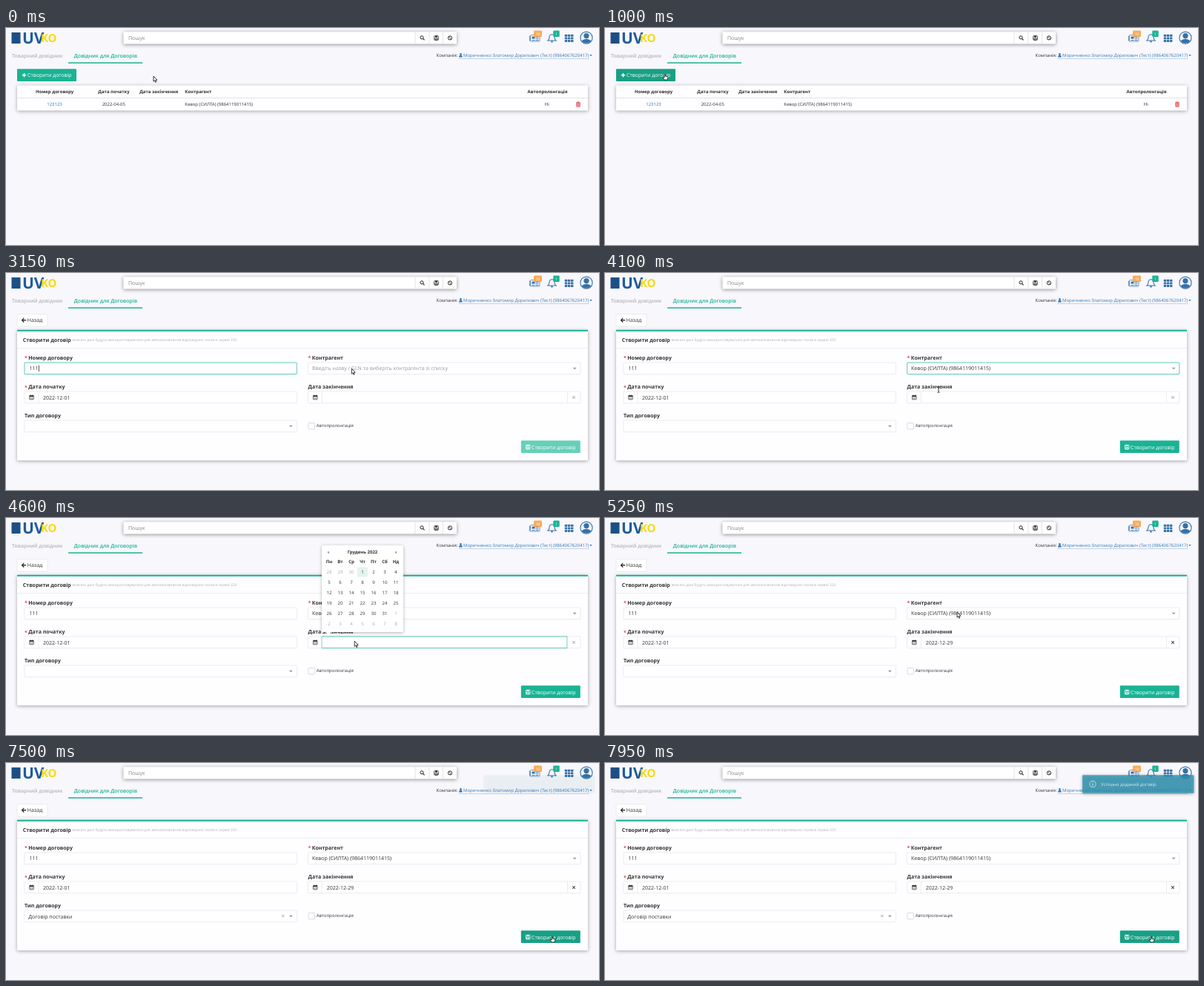
An HTML page with a canvas that plays this animation: 800x293 px, repeating every 8 s.

```html
<!DOCTYPE html>
<html lang="uk">
<head>
<meta charset="utf-8">
<title>Довідник для Договорів</title>
<style>
html, body { margin: 0; width: 100%; height: 100%; overflow: hidden; background: #f8f7fc; }
canvas { display: block; width: 800px; height: 293px; }
</style>
</head>
<body>
<canvas id="stage"></canvas>
<script>
const W = 800, H = 293, LOOP = 8000;
const TEAL = '#1ab394', TEAL_DARK = '#18a085', BLUE = '#337ab7', INK = '#333', LINE = '#e3e4e8';
const PARTNER = 'Кевор (СИЛТА) (9864119011415)';
const canvas = document.getElementById('stage');
const ctx = canvas.getContext('2d');
const dpr = window.devicePixelRatio || 1;
canvas.width = W * dpr;
canvas.height = H * dpr;

// Moments of the story, in ms
const HOVER = 800, OPEN = 1250, FOCUS = 1950, PICK = 3250, PICKED = 3900,
  CALENDAR = 4420, DATED = 5060, TYPES = 5720, TYPED = 6220, AIM = 6970, SAVE = 7350, TOAST = 7480;

// Pointer stops: time, x, y
const PATH = [
  [0, 199, 65], [850, 81, 63], [1350, 81, 63], [1900, 102, 127], [2650, 102, 127],
  [3200, 475, 129], [3680, 475, 129], [3850, 462, 144], [3920, 462, 144], [4100, 450, 157],
  [4350, 470, 168], [4550, 470, 168], [4950, 475, 127], [5280, 475, 127], [5680, 200, 206],
  [5850, 200, 206], [6150, 147, 223], [6380, 147, 223], [7060, 737, 235], [LOOP, 737, 235]
];

const clamp = v => Math.max(0, Math.min(1, v));
const ease = p => p * p * (3 - 2 * p);
const within = (t, a, b) => t >= a && t < b;

function pointerAt(t) {
  const i = PATH.findIndex(k => k[0] > t);
  const [a, b] = [PATH[i - 1], PATH[i]];
  const p = ease((t - a[0]) / (b[0] - a[0]));
  return [a[1] + (b[1] - a[1]) * p, a[2] + (b[2] - a[2]) * p];
}

function text(s, x, y, { size = 7, weight = 400, color = INK, align = 'left' } = {}) {
  ctx.font = `${weight} ${size}px "Open Sans", sans-serif`;
  ctx.fillStyle = color;
  ctx.textAlign = align;
  ctx.textBaseline = 'alphabetic';
  ctx.fillText(s, x, y + size * 0.36);
  return ctx.measureText(s).width;
}

function rect(x, y, w, h, color) {
  ctx.fillStyle = color;
  ctx.fillRect(x, y, w, h);
}

function round(x, y, w, h, r, fill, stroke) {
  ctx.beginPath();
  ctx.roundRect(x, y, w, h, r);
  if (fill) { ctx.fillStyle = fill; ctx.fill(); }
  if (stroke) { ctx.strokeStyle = stroke; ctx.lineWidth = 0.7; ctx.stroke(); }
}

function line(points, color, width = 1, close = false) {
  ctx.beginPath();
  points.forEach(([x, y], i) => i ? ctx.lineTo(x, y) : ctx.moveTo(x, y));
  if (close) ctx.closePath();
  ctx.strokeStyle = color;
  ctx.lineWidth = width;
  ctx.stroke();
}

function poly(points, color) {
  ctx.beginPath();
  points.forEach(([x, y]) => ctx.lineTo(x, y));
  ctx.fillStyle = color;
  ctx.fill();
}

function disc(x, y, r, color) {
  ctx.beginPath();
  ctx.arc(x, y, r, 0, Math.PI * 2);
  ctx.fillStyle = color;
  ctx.fill();
}

function ring(x, y, r, color, width = 1) {
  ctx.beginPath();
  ctx.arc(x, y, r, 0, Math.PI * 2);
  ctx.strokeStyle = color;
  ctx.lineWidth = width;
  ctx.stroke();
}

function card(x, y, w, h, fill = '#fefdff', blur = 5, shade = 'rgba(0,0,0,.34)') {
  ctx.save();
  ctx.shadowColor = shade;
  ctx.shadowBlur = blur * dpr;
  ctx.shadowOffsetY = dpr;
  round(x, y, w, h, 1, fill);
  ctx.restore();
}

// Icons
function floppy(x, y, color, back) {
  round(x - 2.8, y - 2.8, 5.6, 5.6, 0.6, back);
  ctx.strokeStyle = color;
  ctx.lineWidth = 0.8;
  ctx.stroke();
  rect(x - 1.5, y - 2.8, 2.8, 2, color);
  ctx.strokeRect(x - 1.5, y + 0.6, 3, 2.1);
}

function cross(x, y, r, color, width = 0.8) {
  line([[x - r, y - r], [x + r, y + r]], color, width);
  line([[x - r, y + r], [x + r, y - r]], color, width);
}

function caret(x, y, color = '#999', r = 2.5) {
  poly([[x - r, y - r / 2], [x + r, y - r / 2], [x, y + r / 2]], color);
}

function dateIcon(x, y) {
  round(x - 2.8, y - 2.3, 5.6, 5.3, 0.4, null, '#333');
  rect(x - 2.8, y - 2.4, 5.6, 1.6, '#333');
  for (const dx of [-1.4, 1.4]) rect(x + dx - 0.4, y - 3.4, 0.8, 1.6, '#333');
  for (const dx of [-1, 1]) line([[x + dx, y - 1], [x + dx, y + 3]], '#555', 0.4);
  line([[x - 2.8, y + 1], [x + 2.8, y + 1]], '#555', 0.4);
}

function trash(x, y) {
  const red = '#e0494f';
  rect(x - 3, y - 2.6, 6, 0.9, red);
  rect(x - 1.2, y - 3.5, 2.4, 0.9, red);
  round(x - 2.3, y - 1.7, 4.6, 5, 0.5, '#f0a3a6', red);
  for (const dx of [-0.9, 0.9]) line([[x + dx, y - 0.8], [x + dx, y + 2.4]], red, 0.5);
}

function person(x, y, color) {
  disc(x, y - 1.3, 1.4, color);
  round(x - 2.2, y, 4.4, 2.7, [1.6, 1.6, 0.3, 0.3], color);
}

function badge(x, w, label, color) {
  round(x, 3.5, w, 8.5, 1.2, color);
  text(label, x + w / 2, 7.8, { size: 5, color: '#fff', align: 'center' });
}

function header() {
  const blue = '#3571a8';
  rect(7.5, 6, 12, 15, '#1c4f87');
  text('UV', 22, 13.6, { size: 21, weight: 700, color: '#1d5c9c' });
  text('KO', 68.5, 13.6, { size: 15, weight: 700, color: '#fbd90f', align: 'right' });

  card(158.5, 5.2, 449.5, 16.3, '#fff', 5, 'rgba(0,0,0,.42)');
  for (const x of [552, 571, 589.5]) rect(x - 0.4, 5.2, 0.8, 16.3, '#ddd');
  text('Пошук', 165, 13.4, { color: '#858585' });
  ring(561, 12.8, 2.1, '#222', 1);
  line([[562.6, 14.4], [564.5, 16.4]], '#222', 1.2);
  floppy(580.5, 13.4, '#222', '#fff');
  ring(599, 13.4, 2.6, '#222', 1);
  line([[597.2, 11.6], [600.8, 15.2]], '#222', 0.9);

  round(707.5, 9.5, 12.5, 8.5, 1, null, blue);
  line([[707.5, 11], [706.4, 11], [706.4, 17], [707.5, 18]], blue, 0.8);
  rect(709.5, 11.5, 4, 3, blue);
  for (const y of [12, 14, 16]) rect(714.5, y, 4, 0.8, blue);
  rect(709.5, 16, 4, 0.8, blue);
  badge(712, 11, '10', '#f8ac59');

  ctx.beginPath();
  ctx.moveTo(731, 17);
  ctx.quadraticCurveTo(733, 15.5, 733, 12.5);
  ctx.bezierCurveTo(733, 7.5, 740, 7.5, 740, 12.5);
  ctx.quadraticCurveTo(740, 15.5, 742, 17);
  ctx.closePath();
  ctx.strokeStyle = blue;
  ctx.lineWidth = 1.1;
  ctx.stroke();
  disc(736.5, 18.4, 1.2, blue);
  badge(738.3, 8.4, '1', TEAL);

  for (let i = 0; i < 9; i++)
    round(753.8 + i % 3 * 4.1, 8.8 + Math.floor(i / 3) * 3.6, 3.4, 2.9, 0.4, blue);

  ring(783, 13.2, 8.1, blue, 1.1);
  ctx.save();
  ctx.beginPath();
  ctx.arc(783, 13.2, 7.6, 0, Math.PI * 2);
  ctx.clip();
  disc(783, 10.6, 3.6, blue);
  ctx.beginPath();
  ctx.ellipse(783, 20, 7, 5.3, 0, 0, Math.PI * 2);
  ctx.fill();
  ctx.restore();

  text('Товарний довідник', 8, 37.3, { weight: 600, color: '#b4b5ba' });
  text('Довідник для Договорів', 91.8, 37.3, { weight: 600, color: TEAL });
  rect(84, 46.3, 100, 1.5, TEAL);

  text('Компанія:', 580.5, 36.8, { size: 6 });
  person(613.4, 36.8, BLUE);
  const owner = 'Моричненко Златомир Дорилович (Тест) (9864067620417)';
  const w = text(owner, 617, 36.8, { size: 6, color: BLUE });
  ctx.setLineDash([1, 1]);
  line([[611, 41.4], [617 + w, 41.4]], BLUE, 0.6);
  ctx.setLineDash([]);
  caret(617 + w + 2.8, 37, BLUE, 1.8);
}

function list(t) {
  round(15, 55.3, 80, 16.7, 1, t >= HOVER ? TEAL_DARK : TEAL);
  rect(21.8, 62.9, 5.4, 1.5, '#fff');
  rect(23.75, 61, 1.5, 5.4, '#fff');
  text('Створити договір', 29, 63.7, { color: '#fff' });

  card(15, 77.5, 770, 34);
  rect(15, 94.2, 770, 0.8, '#dcdce0');
  const head = { size: 6, weight: 700, align: 'center' };
  text('Номер договору', 65.5, 86, head);
  text('Дата початку', 145.5, 86, head);
  text('Дата закінчення', 206.3, 86, head);
  text('Контрагент', 241.3, 86, { ...head, align: 'left' });
  text('Автопролонгація', 730.5, 86, head);
  const cell = { size: 6, align: 'center' };
  text('123123', 65.5, 103, { ...cell, color: BLUE });
  text('2022-04-05', 145.3, 103, cell);
  text(PARTNER, 241.3, 103, { size: 6 });
  text('Ні', 729.8, 103, cell);
  trash(772, 103);
}

function label(s, x, y, required) {
  if (required) text('*', x, y + 0.5, { weight: 700, color: '#e0494f' });
  text(s, x + (required ? 5.2 : 0), y, { weight: 700 });
}

function field(x, y, focused) {
  round(x, y, 367.3, 15.6, 0.8, '#fff', focused ? TEAL : LINE);
}

function typing(s, x, y, t) {
  const w = text(s, x, y);
  if (t % 1000 < 500) rect(x + w + 0.4, y - 4.2, 0.8, 8.4, '#222');
}

function dropdown(x, y, options, active) {
  const row = 15;
  card(x, y, 367.3, row * options.length, '#fff', 3, 'rgba(0,0,0,.2)');
  options.forEach((s, i) => {
    if (i === active) rect(x, y + i * row, 367.3, row, '#ebf5ff');
    text(s, x + 5.5, y + (i + 0.5) * row);
  });
}

function calendar() {
  const x = 426, y = 37, col = 15, row = 14;
  card(x, y, 110, 117, '#fff', 4, 'rgba(0,0,0,.3)');
  poly([[x + 5, y + 117], [x + 13, y + 117], [x + 9, y + 121]], '#fff');
  const mid = { size: 6, align: 'center' };
  text('Грудень 2022', x + 55, y + 9, { ...mid, weight: 700 });
  text('«', x + 9, y + 9, mid);
  text('»', x + 100, y + 9, mid);
  ['Пн', 'Вт', 'Ср', 'Чт', 'Пт', 'Сб', 'Нд'].forEach((d, i) =>
    text(d, x + 10 + i * col, y + 22, { ...mid, weight: 700 }));
  for (let i = 0; i < 42; i++) {
    const n = i - 2;
    const inside = n >= 1 && n <= 31;
    const cx = x + 10 + i % 7 * col, cy = y + 36 + Math.floor(i / 7) * row;
    if (n === 1) round(cx - 7, cy - 6.5, 14, 13, 1, '#e4f4f0');
    text(n < 1 ? n + 30 : n > 31 ? n - 31 : n, cx, cy, { ...mid, color: inside ? INK : '#aaa' });
  }
}

function form(t) {
  round(15, 55.5, 41, 16.5, 1, '#fff', LINE);
  line([[21.7, 63.7], [27.2, 63.7]], '#222', 1.3);
  line([[24.3, 60.9], [21.6, 63.7], [24.3, 66.5]], '#222', 1.2);
  text('Назад', 28.8, 63.7);

  card(15, 77, 770, 176);
  rect(15, 76.8, 770, 2, TEAL);
  rect(15, 101, 770, 0.7, '#e9e9ed');
  const w = text('Створити договір', 22.8, 90, { weight: 700 });
  text('внесені дані будуть використовуватися для автозаповнення відповідних полів в сервісі EDI',
    22.8 + w + 1.7, 90.3, { size: 5, color: '#b3b3b8' });

  label('Номер договору', 25, 114.3, true);
  label('Контрагент', 407.6, 114.3, true);
  label('Дата початку', 25, 153.5, true);
  label('Дата закінчення', 407.6, 153.5);
  label('Тип договору', 25, 192.5);

  const inNumber = within(t, FOCUS, PICK);
  const number = '111'.slice(0, [2180, 2400, 2580].filter(k => t >= k).length);
  field(25, 121, inNumber);
  if (inNumber) typing(number, 31.5, 128.8, t - 2000);
  else text(number, 31.5, 128.8);

  field(407.6, 121, within(t, PICK, CALENDAR));
  const query = 'кев'.slice(0, [3360, 3460, 3560].filter(k => t >= k).length);
  if (t >= PICKED) text(PARTNER, 413, 128.8);
  else if (query) typing(query, 413, 128.8, 0);
  else text('Введіть назву / GLN та виберіть контрагента зі списку', 413, 128.8, { color: '#999' });
  caret(767.2, 129);

  field(25, 160, false);
  rect(43.6, 160, 0.7, 15.6, LINE);
  dateIcon(34.5, 167.8);
  text('2022-12-01', 50, 168);

  const inDate = within(t, CALENDAR, DATED);
  field(407.6, 160, false);
  if (inDate) round(426, 160, 331, 15.6, 0, null, TEAL);
  rect(425.8, 160, 0.7, 15.6, LINE);
  rect(757, 160, 0.7, 15.6, LINE);
  dateIcon(417.2, 167.8);
  if (t >= DATED) text('2022-12-29', 432.7, 168);
  cross(766, 168, 1.8, t >= DATED ? '#555' : '#bbb', 1.1);

  field(25, 199, within(t, TYPES, SAVE));
  caret(384.3, 207);
  if (t >= TYPED) {
    text('Договір поставки', 30.3, 207);
    cross(373.7, 206.5, 1.6, '#888', 0.7);
  }

  round(407.9, 202.5, 8.4, 8.4, 0.8, '#fff', '#ccc');
  text('Автопролонгація', 418.8, 206.3, { size: 6 });

  const save = t < PICKED ? '#67cfb8' : t >= AIM ? TEAL_DARK : TEAL;
  round(694.8, 226.3, 80, 16.7, 1, save);
  floppy(704.2, 235, '#fff', save);
  text('Створити договір', 709, 235, { color: '#fff' });

  if (within(t, PICK, PICKED))
    dropdown(407.6, 137, [t < 3640 ? 'Введіть 3 або більше символів' : PARTNER], t < 3640 ? -1 : 0);
  if (inDate) calendar();
  if (within(t, TYPES, TYPED))
    dropdown(25, 215, ['Договір поставки', 'Договір послуг', 'Договір оренди', 'Договір підряду', 'Інший'], 0);
}

function toast(t) {
  ctx.save();
  ctx.globalAlpha = 0.8 * clamp((t - TOAST) / 320);
  card(644, 16.3, 150.5, 24.4, '#2f96b4', 4, 'rgba(0,0,0,.4)');
  ring(658, 28.4, 4.1, '#fff', 0.8);
  rect(657.5, 27.6, 1, 3.2, '#fff');
  rect(657.5, 25.7, 1, 1, '#fff');
  text('Успішно доданий договір', 669, 28.4, { size: 6, color: '#fff' });
  ctx.restore();
}

function pointer(t) {
  const [x, y] = pointerAt(t);
  const hand = within(t, HOVER, 1450) || within(t, 3800, 3950) || within(t, 4800, 5330) && t < DATED || t >= AIM;
  const beam = within(t, 4020, CALENDAR);
  ctx.save();
  ctx.translate(x, y);
  ctx.lineJoin = 'round';
  if (beam) {
    line([[0, -3], [0, 4]], '#222', 0.9);
    for (const dy of [-3.6, 4.2]) line([[-1.7, dy], [1.7, dy]], '#222', 0.7);
  } else {
    const shape = hand
      ? [[-0.8, -0.5], [0.3, -0.5], [0.5, 2], [3.6, 2.8], [3.8, 4.5], [2.9, 7], [-0.8, 7], [-2.9, 4], [-2.2, 3.3], [-0.8, 4]]
      : [[0, 0], [0, 7.2], [1.6, 5.8], [2.7, 8.3], [3.8, 7.8], [2.7, 5.4], [4.9, 5.2]];
    poly(shape, '#fff');
    line(shape, '#222', 0.9, true);
  }
  ctx.restore();
}

function draw() {
  const now = performance.now() % LOOP;
  const t = now - now % 50;
  ctx.setTransform(dpr, 0, 0, dpr, 0, 0);
  ctx.textRendering = 'geometricPrecision';
  rect(0, 0, W, H, '#f8f7fc');
  header();
  if (t < OPEN) list(t);
  else form(t);
  if (t >= TOAST) toast(t);
  pointer(t);
  requestAnimationFrame(draw);
}
draw();
</script>
</body>
</html>
```
